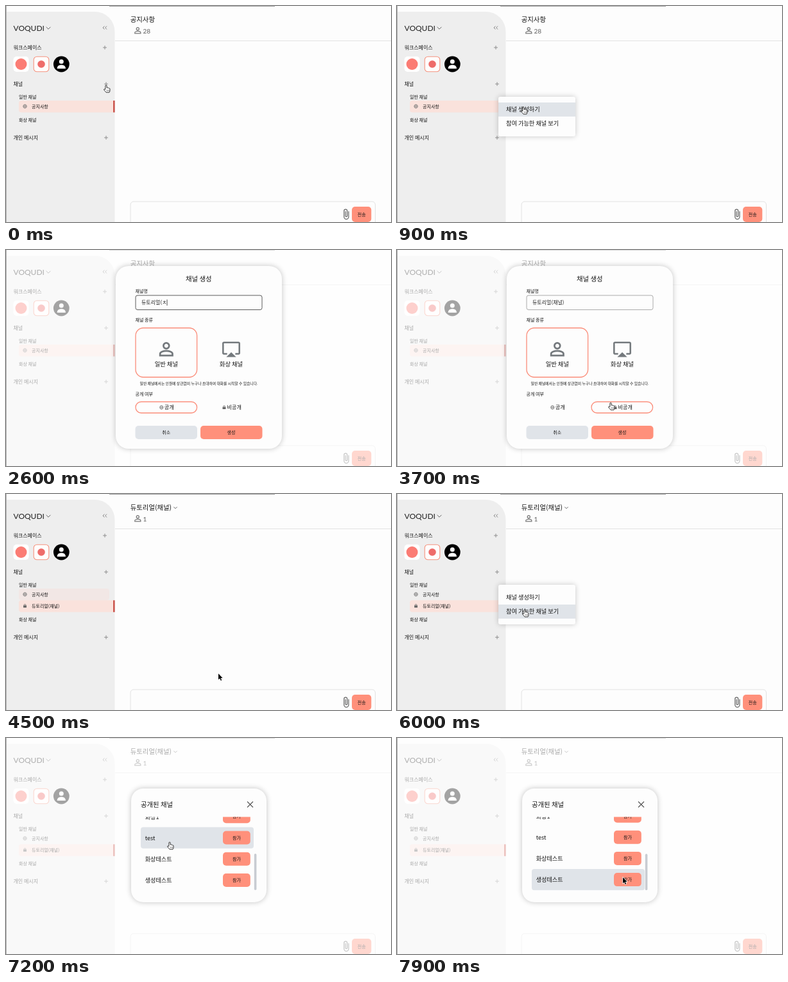
An HTML page with a canvas that plays this animation: 600x338 px, repeating every 8000 ms.

```html
<!DOCTYPE html>
<html lang="ko">
<head>
<meta charset="utf-8">
<title>채널 생성</title>
<style>
html, body { margin: 0; width: 100%; height: 100%; overflow: hidden; background: #fdfdfd; }
canvas { display: block; width: 600px; height: 338px; }
</style>
</head>
<body>
<canvas id="stage"></canvas>
<script>
const W = 600, H = 338, LOOP = 8000;
const canvas = document.getElementById('stage');
const ctx = canvas.getContext('2d');
const dpr = window.devicePixelRatio || 1;
canvas.width = W * dpr;
canvas.height = H * dpr;

const KR = '"Noto Sans CJK KR", "Noto Sans CJK JP", "Noto Sans CJK", sans-serif';
const LATIN = 'Lato, sans-serif';
const CORAL = '#ff907b', INK = '#151515', GREY = '#74797d', MIST = '#e0e4e9', PAPER = '#fdfdfd';

const PERSON = new Path2D('M15.2 8a3.2 3.2 0 1 1-6.4 0a3.2 3.2 0 1 1 6.4 0zM5 19v-1.8c0-2.2 4-3.4 7-3.4s7 1.2 7 3.4V19z');
const AIRPLAY = new Path2D('M6 22h12l-6-6zM21 3H3c-1.1 0-2 .9-2 2v12c0 1.1.9 2 2 2h4v-2H3V5h18v12h-4v2h4c1.1 0 2-.9 2-2V5c0-1.1-.9-2-2-2z');
const CLIP = new Path2D('M17.2 6v11.5a4.7 4.7 0 0 1-9.4 0V5a3.2 3.2 0 0 1 6.4 0v10.5a1.7 1.7 0 0 1-3.4 0V6');
const HAND = new Path2D('M-1.1 6.4V.9Q-1.1 0 0 0T1.1 .9V4Q2.2 3.4 2.9 4.2Q3.9 3.8 4.5 4.7Q6 4.5 6 6V8Q6 10 5 11.2H0Q-1.5 9.5-3.4 7Q-3.6 5.8-2.3 6Z');
const ARROW = new Path2D('M0 0V9.5L2.2 7.5L3.7 11L5.2 10.4L3.7 7H6.6Z');

// time, x, y, shape used from that time on
const TRACK = [
  [0, 156, 124, 'hand'], [300, 156, 124, 'hand'], [750, 197, 158, 'hand'],
  [1050, 197, 158, 'arrow'], [1400, 256, 86, 'beam'], [3050, 256, 86, 'arrow'],
  [3450, 333, 239, 'hand'], [3750, 333, 239, 'hand'], [4000, 331, 281, 'hand'],
  [4250, 331, 281, 'arrow'], [4800, 331, 281, 'arrow'], [5500, 156, 122, 'hand'],
  [5700, 156, 122, 'hand'], [5950, 199, 181, 'hand'], [6420, 199, 181, 'arrow'],
  [6680, 255, 163, 'hand'], [7480, 255, 163, 'arrow'], [7900, 352, 218, 'arrow']
];
const TYPED = ['ㄷ', '듀', '듙', '듀토', '듀톨', '듀토리', '듀토링', '듀토리어', '듀토리얼', '듀토리얼(',
  '듀토리얼(ㅊ', '듀토리얼(채', '듀토리얼(챈', '듀토리얼(채너', '듀토리얼(채널', '듀토리얼(채널)'];
const ROOMS = ['잡담', '드루와', '비디오', '화상1', 'test', '화상테스트', '생성테스트'];
const ROW = 33.2, SCROLL_END = 116.6;

const ramp = (t, a, b) => Math.min(1, Math.max(0, (t - a) / (b - a)));
const ease = p => p * p * (3 - 2 * p);

function pointer(t) {
  let i = TRACK.length - 1;
  while (TRACK[i][0] > t) i--;
  const a = TRACK[i], b = TRACK[i + 1] || a;
  const p = a === b ? 0 : ease(ramp(t, a[0], b[0]));
  return { x: a[1] + (b[1] - a[1]) * p, y: a[2] + (b[2] - a[2]) * p, shape: a[3] };
}

// y is the optical middle of the line
function text(s, x, y, size, { color = INK, align = 'left', weight = 500, font = KR } = {}) {
  ctx.font = `${weight} ${size}px ${font}`;
  ctx.textAlign = align;
  ctx.fillStyle = color;
  ctx.fillText(s, x, y + size * 0.37);
}

function box(x, y, w, h, r, fill, stroke, line = 1) {
  ctx.beginPath();
  ctx.roundRect(x, y, w, h, r);
  if (fill) { ctx.fillStyle = fill; ctx.fill(); }
  if (stroke) { ctx.strokeStyle = stroke; ctx.lineWidth = line; ctx.stroke(); }
}

function disc(x, y, r, fill) {
  ctx.beginPath();
  ctx.arc(x, y, r, 0, 7);
  ctx.fillStyle = fill;
  ctx.fill();
}

function lines(color, width, ...paths) {
  ctx.strokeStyle = color;
  ctx.lineWidth = width;
  ctx.beginPath();
  for (const p of paths) {
    ctx.moveTo(p[0], p[1]);
    for (let i = 2; i < p.length; i += 2) ctx.lineTo(p[i], p[i + 1]);
  }
  ctx.stroke();
}

function icon(path, cx, cy, scale, color, stroke) {
  ctx.save();
  ctx.translate(cx, cy);
  ctx.scale(scale, scale);
  ctx.translate(-12, -12.3);
  if (stroke) { ctx.strokeStyle = color; ctx.lineWidth = stroke; ctx.stroke(path); }
  else { ctx.fillStyle = color; ctx.fill(path); }
  ctx.restore();
}

function panel(x, y, w, h, r, blur, shade) {
  ctx.save();
  ctx.shadowColor = `rgba(0,0,0,${shade})`;
  ctx.shadowBlur = blur * dpr;
  box(x, y, w, h, r, PAPER);
  ctx.restore();
}

function faded(alpha, draw) {
  if (alpha <= 0) return;
  ctx.save();
  ctx.globalAlpha = alpha;
  draw();
  ctx.restore();
}

const plus = (x, y) => lines('#858585', 0.9, [x - 3, y, x + 3, y], [x, y - 3, x, y + 3]);
const chevron = (x, y, r) => lines('#666', 1, [x - r, y - r / 2, x, y + r / 2, x + r, y - r / 2]);

function globe(x, y, r) {
  ctx.strokeStyle = '#777';
  ctx.lineWidth = 0.7;
  ctx.beginPath();
  ctx.arc(x, y, r, 0, 7);
  ctx.moveTo(x + r * 0.45, y);
  ctx.ellipse(x, y, r * 0.45, r, 0, 0, 7);
  ctx.moveTo(x - r, y);
  ctx.lineTo(x + r, y);
  ctx.stroke();
}

function lock(x, y) {
  box(x - 2.5, y - 0.8, 5, 3.6, 0.6, '#666');
  ctx.beginPath();
  ctx.arc(x, y - 1, 1.5, Math.PI, 0);
  ctx.strokeStyle = '#666';
  ctx.lineWidth = 0.8;
  ctx.stroke();
}

function activeRow(y) {
  box(20, y, 147, 18.5, [4, 0, 0, 4], '#fae2dc');
  box(167, y, 2.6, 18.5, 0, '#cb564e');
}

function sidebar(t, made) {
  box(1, 9, 168.5, 340, [0, 31, 0, 0], '#eeeeee');
  text('VOQUDI', 11.5, 34.2, 12, { font: LATIN, weight: 400, color: '#222' });
  chevron(66, 34.5, 3.4);
  lines('#777', 0.9, [153.4, 31.5, 151, 34, 153.4, 36.5], [157, 31.5, 154.6, 34, 157, 36.5]);

  text('워크스페이스', 11.5, 65, 8);
  plus(154, 65);
  box(11.5, 79, 24, 24, 5, '#fff');
  disc(23.5, 91, 9, '#fb7c74');
  box(43.2, 79.2, 23.6, 23.6, 5, '#fffdfc', '#f5937f', 1.1);
  disc(55, 91, 5.8, '#ee6c6a');
  disc(86.3, 91, 12.4, '#000');
  disc(86.3, 87, 3.5, '#fff');
  box(79.7, 92.3, 13.2, 5.8, [5.5, 5.5, 0.6, 0.6], '#fff');

  text('채널', 11.5, 121.8, 8);
  plus(156, 122);
  text('일반 채널', 20, 142, 7);
  if (made) {
    faded(0.35 * (1 - ramp(t, 4480, 4640)), () => box(20, 148, 141, 18, 4, '#fcd8d0'));
    activeRow(166.3);
    lock(29.5, 175);
    text('듀토리얼(채널)', 40, 175.2, 7);
  } else {
    activeRow(148);
  }
  globe(29.5, 157, 2.8);
  text('공지사항', 40, 157.2, 7);
  const drop = made ? 18.2 : 0;
  text('화상 채널', 20, 178 + drop, 7);
  text('개인 메시지', 11.5, 206 + drop, 8);
  plus(156, 206 + drop);
}

function mainPane(made) {
  text(made ? '듀토리얼(채널)' : '공지사항', 193.7, 21.3, 10.4);
  if (made) chevron(264, 21.5, 2.6);
  icon(PERSON, 205.3, 38.5, 0.65, '#777', 1.9);
  text(made ? '1' : '28', 213.5, 39, 10, { font: LATIN, weight: 500, color: '#6c6c6c' });
  lines('#e3e3e3', 1, [170, 54.5, 600, 54.5]);
  box(194, 306, 381.5, 50, 5, null, '#e2e2e2');
  icon(CLIP, 530, 326, 0.76, '#6a6a6a', 1.7);
  box(539, 314, 30.3, 24, 5, CORAL);
  text('전송', 554.2, 326, 7, { align: 'center' });
}

function menu(hover) {
  panel(158, 142, 120, 62, 3, 8, 0.22);
  if (hover >= 0) box(158, 151 + hover * 22, 120, 22, 0, MIST);
  text('채널 생성하기', 170, 162, 9.2);
  text('참여 가능한 채널 보기', 170, 184, 9.2);
}

function createDialog(t) {
  const mid = { align: 'center' };
  panel(171, 25, 259, 286, 20, 9, 0.24);
  text('채널 생성', 300.3, 45.3, 10.4, mid);
  text('채널명', 201.5, 64.2, 7);
  const focused = t > 1420 && t < 3550;
  box(202, 71, 197, 22.5, 3, null, focused ? '#5a5a5a' : '#aaa');

  const n = Math.min(TYPED.length, Math.floor((t - 1900) / 66) + 1);
  const value = n > 0 ? TYPED[n - 1] : '';
  if (value) text(value, 211, 82.2, 8, { weight: 400, color: '#222' });
  else text('채널명을 입력해주세요.', 211, 82.2, 8, { weight: 400, color: '#8a8a8a' });
  if (focused) {
    const x = 211 + (value ? ctx.measureText(value).width + 0.5 : 0);
    lines('#222', 0.8, [x, 77.5, x, 87]);
  }

  text('채널 종류', 201.5, 109, 7);
  box(202, 122, 95.6, 77, 12, null, '#fb8d7a', 1.3);
  icon(PERSON, 249.8, 155.8, 1.38, GREY, 2);
  icon(AIRPLAY, 351, 155.2, 1.27, GREY);
  text('일반 채널', 249.8, 179, 9.3, mid);
  text('화상 채널', 351, 179, 9.3, mid);
  text('일반 채널에서는 인원에 상관없이 누구나 초대하여 대화를 시작할 수 있습니다.', 300.6, 209, 5.8, mid);

  text('공개 여부', 201.5, 225.3, 7);
  const hidden = t >= 3560;
  box(hidden ? 303 : 202, 237.5, 95.6, 17.5, 8.75, null, '#fb8d7a', 1.3);
  globe(242.3, 246.3, 2.8);
  text('공개', 246.7, 246.3, 8.3);
  lock(340, 246.2);
  text('비공개', 344.6, 246.3, 8.1);

  box(201.5, 275, 96.5, 21, 5, MIST);
  box(303, 275, 96.5, 21, 5, CORAL);
  text('취소', 249.8, 285.5, 7, mid);
  text('생성', 351, 285.5, 7, mid);
}

// Fast start, slow finish, as a wheel flick does
const scrollAt = t => SCROLL_END * (1 - Math.pow(1 - ramp(t, 6700, 7300), 2.75));

function roomDialog(t, cur) {
  panel(195, 79, 211, 178, 19, 9, 0.24);
  text('공개된 채널', 210, 104.2, 10.4);
  lines('#555', 1.1, [376, 99.5, 385, 108.5], [385, 99.5, 376, 108.5]);

  const scroll = scrollAt(t);
  const rowY = i => 139 + i * ROW - scroll;
  const hover = t < 6600 ? -1 : t < 6980 ? 1 : Math.round((cur.y + 4 - 139 + scroll) / ROW);
  ctx.save();
  ctx.beginPath();
  ctx.rect(208, 123.5, 184, 115);
  ctx.clip();
  ROOMS.forEach((name, i) => {
    const y = rowY(i);
    if (i === hover) box(210, y - 16.5, 176, 33.2, 4, MIST);
    text(name, 216.7, y + 0.4, 9.1);
    box(338, y - 10.5, 42.8, 21, 5, CORAL);
    text('참가', 359.4, y, 7, { align: 'center' });
  });
  box(386.8, 124 + scroll * 0.492, 3.6, 57, 1.8, '#c8ccd2');
  ctx.restore();
}

function drawPointer({ x, y, shape }) {
  ctx.save();
  ctx.translate(x, y);
  ctx.lineJoin = 'round';
  if (shape === 'beam') {
    const stem = [0, -4, 0, 4], top = [-2, -5, 0, -4, 2, -5], foot = [-2, 5, 0, 4, 2, 5];
    lines('#fff', 2, stem, top, foot);
    lines('#111', 1, stem, top, foot);
  } else if (shape === 'hand') {
    ctx.fillStyle = '#fff';
    ctx.fill(HAND);
    ctx.strokeStyle = '#222';
    ctx.lineWidth = 0.9;
    ctx.stroke(HAND);
    lines('#555', 0.6, [1.1, 7, 1.1, 9.6], [2.8, 7, 2.8, 9.6], [4.4, 7, 4.4, 9.6]);
  } else {
    ctx.strokeStyle = '#fff';
    ctx.lineWidth = 1.4;
    ctx.stroke(ARROW);
    ctx.fillStyle = '#000';
    ctx.fill(ARROW);
  }
  ctx.restore();
}

function render(t) {
  const cur = pointer(t);
  const made = t >= 4200;
  ctx.setTransform(dpr, 0, 0, dpr, 0, 0);
  ctx.fillStyle = PAPER;
  ctx.fillRect(0, 0, W, H);
  sidebar(t, made);
  mainPane(made);
  box(161, 0, 258, 1, 0, '#a3a3a3');

  const menuAlpha = ramp(t, 150, 300) * (1 - ramp(t, 980, 1100)) +
    ramp(t, 5600, 5750) * (1 - ramp(t, 6280, 6400));
  const hover = cur.x < 158 || cur.y < 147 ? -1 : cur.y < 169 ? 0 : 1;
  faded(menuAlpha, () => menu(hover));

  const create = ramp(t, 1000, 1200) * (1 - ramp(t, 4150, 4350));
  const rooms = ramp(t, 6300, 6500);
  faded(Math.max(create, rooms) * 0.64, () => box(0, 0, W, H, 0, '#fff'));
  faded(create, () => createDialog(t));
  faded(rooms, () => roomDialog(t, cur));

  box(0, 0, 1, H, 0, '#b4b4b4');
  if (t < 1900 || t > 2980) drawPointer(cur);
}

const start = performance.now();
function tick() {
  render((performance.now() - start) % LOOP);
  requestAnimationFrame(tick);
}
tick();
</script>
</body>
</html>
```
